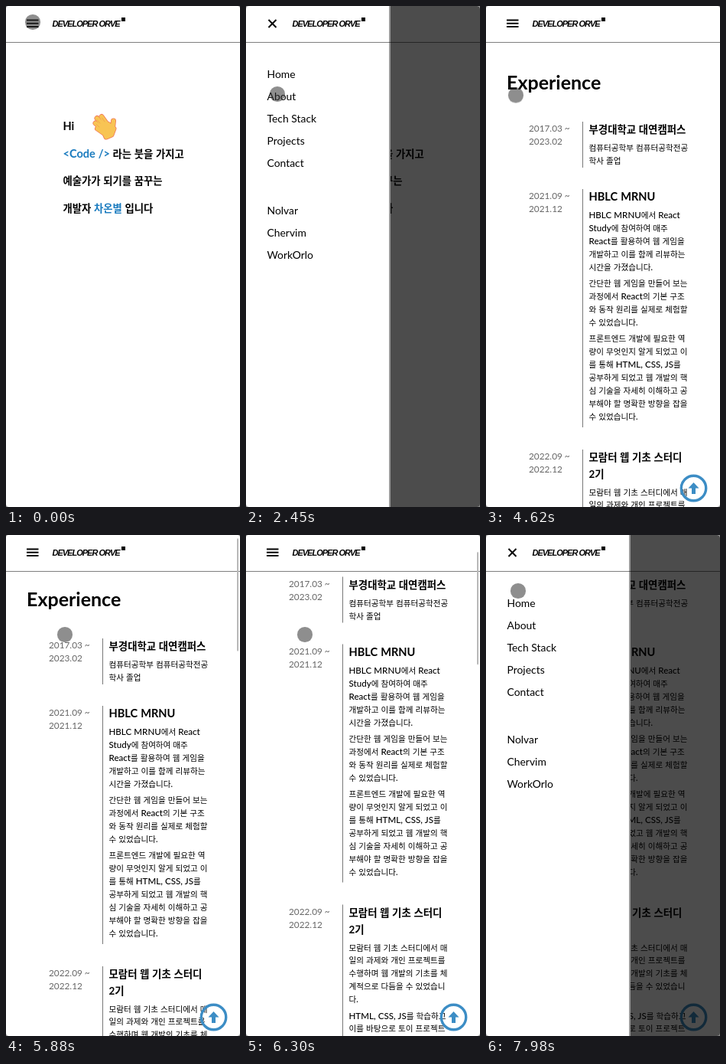
An HTML page that plays this animation: 306 by 654 pixels, repeating every 8 s.

```html
<!DOCTYPE html>
<html lang="ko">
<head>
<meta charset="utf-8">
<title>Portfolio</title>
<style>
@property --scroll { syntax: '<number>'; inherits: true; initial-value: 0; }

html, body { margin: 0; width: 100%; height: 100%; overflow: hidden; background: #888; }

.stage {
  position: relative; width: 306px; height: 654px; overflow: hidden;
  border-radius: 4px; background: #fff; color: #000;
  font-family: Lato, 'Noto Sans CJK KR', 'Noto Sans CJK', sans-serif;
}
.stage *, .layer { position: absolute; }
.stage p, .stage h1, .stage h2 { margin: 0; white-space: pre; }
.stage span { position: static; font-size: 1.09em; line-height: 0; }
.stage em { position: static; font-style: normal; color: #1a7bbf; }
.layer { inset: 0; }

.home, .page, .menu, .cursor, .thumb {
  animation: 8s steps(1, end) infinite;
}

/* Intro */
.home { animation-name: home; }
.home p { left: 74.5px; font-size: 13.35px; font-weight: 700; line-height: 20px; word-spacing: .03em; }

/* Experience list */
.page { animation-name: page, scroll; animation-duration: 8s; }
.list { inset: 0; transform: translateY(calc(var(--scroll) * -1px)); }
.list h1 { left: 27px; top: 84px; font-size: 25px; line-height: 30px; font-weight: 700; }
.item { left: 56px; width: 240px; }
.item::before { content: ''; position: absolute; left: 70px; top: 0; bottom: 0; width: 1px; background: #777; }
.item time { white-space: pre; font-size: 11.8px; line-height: 17px; color: #666; }
.text { left: 78.5px; top: 0; }
.text h2, .text p { position: relative; word-spacing: .03em; }
.text h2 { font-size: 13.4px; line-height: 21.5px; font-weight: 700; }
.text p { margin-top: 4.5px; font-size: 10.6px; line-height: 16.9px; font-weight: 500; }
.thumb {
  left: 301.5px; top: .7px; width: 2.5px; height: 147px; border-radius: 2px;
  background: #b8b8b8; opacity: 0; z-index: 2;
  transform: translateY(calc(var(--scroll) * .22px)); animation-name: thumb;
}
.to-top { left: 253px; top: 610.5px; }

/* Header */
.bar { left: 0; top: 0; width: 306px; height: 47px; background: #fff; }
.icon { left: 26px; top: 14px; fill: none; stroke: #000; stroke-width: 2; }
.brand {
  left: 60.5px; top: 16px; line-height: 14px; white-space: pre;
  font: italic bold 11px/14px 'Liberation Sans', sans-serif; letter-spacing: -1px;
}
.mark { left: 151px; top: 15px; width: 5px; height: 5px; background: #000; }
.rule { left: 0; top: 47px; width: 306px; height: 1px; background: rgba(0, 0, 0, .5); }

/* Side menu */
.menu { animation-name: menu; }
.veil { inset: 0; background: rgba(0, 0, 0, .7); }
.panel { left: 0; top: 0; width: 189px; height: 654px; box-sizing: border-box; background: #fff; border-right: 2px solid #999; }
.panel p { left: 27.5px; font-size: 13.9px; line-height: 29.1px; }

.cursor {
  left: -9.75px; top: -9.75px; width: 19.5px; height: 19.5px; border-radius: 50%;
  background: rgba(50, 50, 50, .55); animation-name: cursor;
}

@keyframes home { 0% { visibility: visible } 57.75%, 100% { visibility: hidden } }
@keyframes page { 0% { visibility: hidden } 57.75%, 100% { visibility: visible } }
@keyframes menu {
  0% { visibility: hidden }
  2.625% { visibility: visible }
  57.75% { visibility: hidden }
  93.625%, 100% { visibility: visible }
}
@keyframes scroll {
  0% { --scroll: 0 }
  73.5% { --scroll: 16 }
  74.375% { --scroll: 41 }
  75.25% { --scroll: 63 }
  76.125% { --scroll: 77 }
  77% { --scroll: 87 }
  77.875% { --scroll: 93 }
  78.75%, 100% { --scroll: 96.5 }
}
@keyframes thumb {
  0% { opacity: 0 }
  73.5% { opacity: 1 }
  83.125% { opacity: .5 }
  84.875%, 100% { opacity: 0 }
}
@keyframes cursor {
  0% { transform: translate(35px, 21px) }
  8.75% { transform: translate(35px, 21px); animation-timing-function: steps(3, start) }
  11.375% { transform: translate(38px, 65px); animation-timing-function: steps(3, start) }
  14% { transform: translate(41px, 99px); animation-timing-function: steps(4, start) }
  17.5% { transform: translate(41.5px, 112.5px) }
  18.375% { transform: translate(41px, 112.5px) }
  20.125% { transform: translate(42.5px, 113px) }
  30.625% { transform: translate(41px, 115px) }
  31.5% { transform: translate(41px, 115px); animation-timing-function: steps(5, start) }
  35.875% { transform: translate(39px, 138px); animation-timing-function: steps(5, start) }
  40.25% { transform: translate(38px, 148px) }
  48.125% { transform: translate(38px, 148px); animation-timing-function: steps(3, start) }
  50.75% { transform: translate(40px, 128px); animation-timing-function: steps(3, start) }
  53.375% { transform: translate(39px, 116.5px) }
  65.625% { transform: translate(39px, 116.5px); animation-timing-function: steps(3, start) }
  68.25% { transform: translate(77px, 130px) }
  84.875% { transform: translate(77px, 130px); animation-timing-function: steps(4, start) }
  88.375% { transform: translate(52px, 75px); animation-timing-function: steps(5, start) }
  92.75% { transform: translate(32px, 22px) }
  98% { transform: translate(35px, 35px) }
  98.875% { transform: translate(39px, 56px) }
  99.75%, 100% { transform: translate(42px, 73px) }
}
</style>
</head>
<body>
<main class="stage">
  <section class="layer home">
    <p style="top:147px"><span>Hi</span></p>
    <p style="top:183px"><em><span>&lt;Code /&gt;</span></em> 라는 붓을 가지고</p>
    <p style="top:218px">예술가가 되기를 꿈꾸는</p>
    <p style="top:254px">개발자 <em>차온별</em> 입니다</p>
    <svg style="left:112px;top:140px" width="36" height="36" viewBox="112 140 36 36" stroke-linecap="round" stroke-linejoin="round">
      <defs>
        <path id="hand" d="M131 160 119 146.5M127 162 117 153M134 157 125 144.5M128 166 119.5 160M139 163 140.5 150M126 160 133 154 141 160 138 168 131 171Z"/>
      </defs>
      <use href="#hand" fill="#f0785a" stroke="#f0785a" stroke-width="7"/>
      <use href="#hand" fill="#f8c454" stroke="#f8c454" stroke-width="5.4"/>
      <path d="M123 153 119 148.5M129 151 125.5 146M122 158 118 154.5" fill="none" stroke="#f0a04c" stroke-width=".8"/>
    </svg>
  </section>

  <section class="layer page">
    <div class="list">
      <h1>Experience</h1>
      <article class="item" style="top:151px;height:59.5px">
        <time>2017.03 ~
2023.02</time>
        <div class="text">
          <h2>부경대학교 대연캠퍼스</h2>
          <p>컴퓨터공학부 컴퓨터공학전공
학사 졸업</p>
        </div>
      </article>
      <article class="item" style="top:239px;height:311px">
        <time>2021.09 ~
2021.12</time>
        <div class="text">
          <h2><span>HBLC MRNU</span></h2>
          <p><span>HBLC MRNU</span>에서 <span>React</span>
<span>Study</span>에 참여하여 매주
<span>React</span>를 활용하여 웹 게임을
개발하고 이를 함께 리뷰하는
시간을 가졌습니다.</p>
          <p>간단한 웹 게임을 만들어 보는
과정에서 <span>React</span>의 기본 구조
와 동작 원리를 실제로 체험할
수 있었습니다.</p>
          <p>프론트엔드 개발에 필요한 역
량이 무엇인지 알게 되었고 이
를 통해 <span>HTML, CSS, JS</span>를
공부하게 되었고 웹 개발의 핵
심 기술을 자세히 이해하고 공
부해야 할 명확한 방향을 잡을
수 있었습니다.</p>
        </div>
      </article>
      <article class="item" style="top:579px;height:240px">
        <time>2022.09 ~
2022.12</time>
        <div class="text">
          <h2>모람터 웹 기초 스터디
2기</h2>
          <p>모람터 웹 기초 스터디에서 매
일의 과제와 개인 프로젝트를
수행하며 웹 개발의 기초를 체
계적으로 다듬을 수 있었습니
다.</p>
          <p><span>HTML, CSS, JS</span>를 학습하고
이를 바탕으로 토이 프로젝트</p>
        </div>
      </article>
    </div>
    <svg class="to-top" width="37" height="37" fill="none" stroke="#3c8dc5">
      <circle cx="18.5" cy="18.5" r="16.2" stroke-width="3.4"/>
      <path d="M18.5 11 25.5 18.5H21V26H16V18.5H11.5Z" fill="#3c8dc5" stroke="none"/>
    </svg>
  </section>

  <header class="bar">
    <svg class="icon" width="17" height="17"><path d="M1 4.5H16.5M1 8.8H16.5M1 13H16.5"/></svg>
  </header>
  <div class="layer page"><div class="thumb"></div></div>

  <nav class="layer menu">
    <div class="veil"></div>
    <div class="panel">
      <svg class="icon" width="17" height="17"><path d="M3.5 4 13.5 14M13.5 4 3.5 14"/></svg>
      <p style="top:74px">Home
About
Tech Stack
Projects
Contact</p>
      <p style="top:251.5px">Nolvar
Chervim
WorkOrlo</p>
    </div>
  </nav>

  <div class="brand">DEVELOPER ORVE</div>
  <div class="mark"></div>
  <div class="rule"></div>
  <div class="cursor"></div>
</main>
</body>
</html>
```
